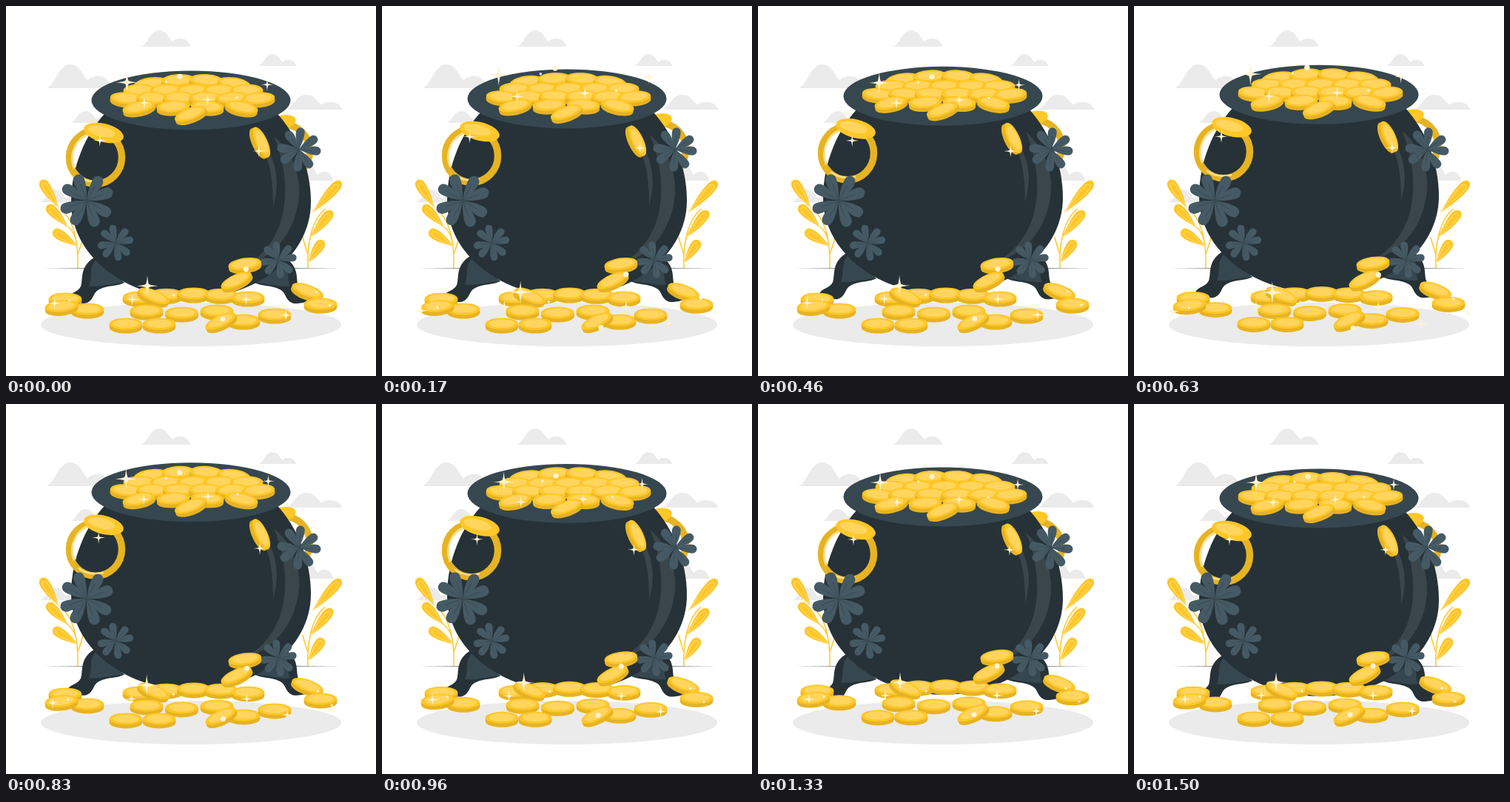
Animation of 500 by 500 pixels, one loop 1540 ms. Source, as an HTML page:

```html
<!DOCTYPE html>
<html lang="en">
<head>
<meta charset="utf-8">
<title>Pot of gold</title>
<style>
html, body { margin: 0; width: 100%; height: 100%; overflow: hidden; background: #fff; }
svg { display: block; width: 100%; height: 100%; }
</style>
</head>
<body>
<svg id="stage" viewBox="0 0 500 500"></svg>
<script>
const GOLD = '#FFC727', LIGHT = '#FFD55E', SIDE = '#E6B323', PALE = '#FFE08A';
const DARK = '#263238', SLATE = '#37474F', LEAF = '#455A64', GLOSS = '#3B464B';
const GREY = '#EBEBEB', CREAM = '#FFF3D3';
const LOOP = 1540, LIFT = 9.2;

const path = (d, fill) => `<path d="${d}" fill="${fill}"/>`;
const line = (d, color, width) => `<path d="${d}" fill="none" stroke="${color}" stroke-width="${width}"/>`;
const ellipse = (x, y, rx, ry, fill, rot = 0) =>
  `<ellipse cx="${x}" cy="${y}" rx="${rx}" ry="${ry}" fill="${fill}" transform="rotate(${rot} ${x} ${y})"/>`;
const group = (id, ...parts) => `<g id="${id}">${parts.join('')}</g>`;
const mirror = (axis, part) => part + `<g transform="translate(${2 * axis}) scale(-1 1)">${part}</g>`;
const repeat = (n, draw) => Array.from({ length: n }, (_, i) => draw(i)).join('');
const each = (list, draw) => list.map(args => draw(...args)).join('');

const cloud = (x, y, w, h) =>
  `<path transform="translate(${x} ${y}) scale(${w} ${h})" fill="${GREY}"
    d="M0 0C.14-.06.18-1 .37-1C.54-1 .58-.42 .64-.33C.75-.66 .97-.55 1 0Z"/>`;

const coin = (x, y, rot = 0) =>
  `<g transform="translate(${x} ${y}) rotate(${rot})">
    <path d="M-22.3-2.5V2.5A22.3 8 0 0 0 22.3 2.5V-2.5Z" fill="${SIDE}"/>
    ${ellipse(0, -2.5, 22.3, 8, GOLD)}${ellipse(0, -2.9, 17.5, 5.8, LIGHT)}</g>`;

// Evenly spaced coins, arched upwards in the middle and tilted outwards
const coinRow = (y, left, right, n, arch = 0, tilt = 0) => repeat(n, i => {
  const u = 2 * i / (n - 1) - 1;
  return coin((left + right + u * (right - left)) / 2, y - arch * (1 - u * u), tilt * u);
});

// Leaf from its base (x, y) to its tip, with a pale inner outline
const leaf = (x, y, tipX, tipY) => {
  const len = Math.hypot(tipX - x, tipY - y);
  const rot = Math.atan2(tipY - y, tipX - x) * 180 / Math.PI;
  return `<g transform="translate(${x} ${y}) rotate(${rot}) scale(${len} 12)">
    <path d="M0 0C.3-.3 .55-.65 .82-.6C1.05-.5 1.05.4 .85.5C.6.65 .25.3 0 0Z" fill="${GOLD}"/>
    <path d="M0 0C.4-.2 .6-.4 .8-.3C.92-.2 .9.2 .8.25C.6.35 .3.1 0 0" fill="none"
      stroke="${PALE}" vector-effect="non-scaling-stroke"/></g>`;
};

// Four hearts, each made of two mirrored lobes
const lobe = path('M0 0C-4-10-9-21-8-31C-7-41 4-41 7-34C9-26 4-10 0 0Z', LEAF) + line('M0 0L0-25', SLATE, 0.8);
const clover = (x, y, scale, rot) =>
  `<g transform="translate(${x} ${y}) rotate(${rot}) scale(${scale})">${repeat(4, i =>
    `<g transform="rotate(${i * 90 - 40})">${mirror(0, `<g transform="rotate(20)">${lobe}</g>`)}</g>`)}</g>`;

const sparkle = (x, y, r = 8.5) =>
  `<path transform="translate(${x} ${y}) scale(${r})" fill="${CREAM}"
    d="M0-1Q.06-.3.15-.15Q.3-.06 1 0Q.3.06.15.15Q.06.3 0 1Q-.06.3-.15.15Q-.3.06-1 0Q-.3-.06-.15-.15Q-.06-.3 0-1Z"/>`;
const dot = (x, y, r = 1.6) => ellipse(x, y, r, r, CREAM);

const ring = (x, y) =>
  `<ellipse cx="${x}" cy="${y}" rx="35.5" ry="36" fill="none" stroke="${SIDE}" stroke-width="9.5"/>`;

const clouds = each([
  [182, 55, 67, 22], [54, 111, 88, 32], [341, 81, 51, 16], [377, 140, 77, 20],
  [87, 158, 55, 16], [385, 236, 57, 24], [46, 265, 55, 17]], cloud);

const plants = mirror(252.5, line('M97 354C98 320 92 290 74 274M96 325Q94 305 82 297M97 335Q102 322 104 312', GOLD, 1.5))
  + repeat(3, i =>
    leaf(71 + 13 * i, 273 + 26 * i, 48 + 8 * i, 235 + 34 * i) +
    leaf(414 - 3 * i, 279 + 34 * i, 453 - 12 * i, 237 + 40 * i));

const legs = mirror(248,
  path('M122 338C98 352 105 368 101 379C97 387 87 387 83 394Q88 402 107 402C120 398 116 388 126 383C138 377 150 379 160 374Z', DARK)
  + path('M124 341C110 352 118 366 112 378C122 381 140 375 160 374Z', SLATE));

const body = path('M133 146C108 173 88 217 88 265C88 340 165 395 250 395C335 395 412 340 412 265C412 217 392 173 367 146Z', DARK)
  + path('M362 176C390 200 400 235 395 265C388 310 360 340 322 352C360 330 376 295 377 255C378 225 372 200 362 176Z', GLOSS)
  + path('M352 190C366 215 370 240 361 271C361 240 358 215 348 196Z', GLOSS);

const leftHandle = ring(121, 204.5)
  + line('M92 220C84 200 95 178 112 173M98 230Q112 241 132 236', PALE, 2.5)
  + ellipse(132, 171.5, 27.5, 12.5, GOLD, 14) + ellipse(129, 169.5, 19, 7, LIGHT, 14);

const potCoins = coinRow(107, 195, 308, 4, 5, 9) + coinRow(116, 181, 325, 5)
  + coinRow(127, 163, 341, 6, 1, -4) + coinRow(139, 180, 318, 4, 1, 12) + coin(250, 148, -20);

const looseCoins = [[80, 398], [407, 387, 20], [425, 405]];
const groundCoins = coinRow(396, 180, 327, 5, 5) + coin(199, 394, 22)
  + coin(323, 351, -8) + coin(312, 373, -25) + coinRow(414, 190, 285, 3, -3)
  + coinRow(432, 162, 207, 2) + coin(321, 427) + coin(291, 428, -25) + coin(363, 419)
  + each(looseCoins, coin) + coin(110, 412) + coin(75, 408, -6);

const sparkles = each([
  [165, 106, 14], [188, 133], [129, 183], [351, 109], [340, 197], [272, 129],
  [192, 376, 14], [172, 394], [69, 399], [323, 394], [376, 415]], sparkle)
  + each([[235, 98, 3.4], [323, 354, 3.4], [292, 420, 3.4], [217, 105], [311, 126], [227, 388]], dot)
  + each(looseCoins, (x, y) => dot(x + 9, y - 3));

const $ = id => document.getElementById(id);
$('stage').innerHTML = [
  clouds,
  path('M50 354.2Q250 352.6 452 354.2Q250 355.4 50 354.2Z', DARK),
  ellipse(250, 430.5, 203, 29.5, GREY),
  plants,
  group('pot',
    ring(375, 196), ellipse(372, 158, 20, 10, GOLD, -14), legs, body,
    ellipse(250, 127.5, 134.5, 40, SLATE), potCoins, leftHandle,
    coin(343, 185, 65)),
  each([[109, 263, 0.96, 0], [148, 320, 0.63, 10], [396, 194, 0.76, 25], [368, 343, 0.64, 12]], clover),
  group('coins', groundCoins),
  group('sparkles', sparkles)
].join('');

const rise = t => t < 0 ? 0 : LIFT * (1 - Math.abs(t / 750 % 2 - 1));

// Double heartbeat: a round swell, then a quick one that settles slowly
const beat = t => {
  if (t < 450) return 0.092 * Math.sin(Math.PI * (t + 30) / 480);
  const x = Math.min((t - 450) / 625, 1);
  return 0.9 * x * (1 - x) ** 3;
};

function draw() {
  const t = performance.now() % LOOP;
  $('pot').setAttribute('transform', `translate(0 ${-rise(t)})`);
  $('coins').setAttribute('transform', `translate(0 ${-rise(t - 500)})`);
  $('sparkles').setAttribute('transform', `translate(247 255) scale(${1 + beat(t)}) translate(-247 -255)`);
  requestAnimationFrame(draw);
}
draw();
</script>
</body>
</html>
```
